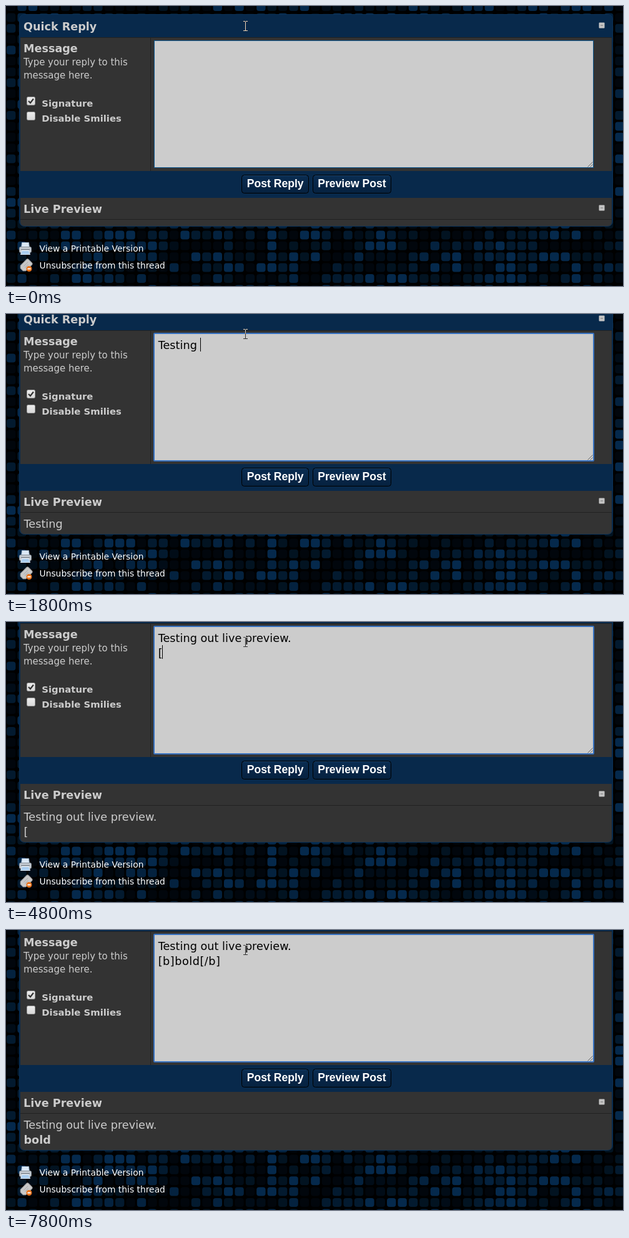
Animation, 988 px wide and 448 px high, one loop 8000 ms. Source, as an HTML page:

```html
<!DOCTYPE html>
<html lang="en">
<head>
<meta charset="utf-8">
<title>Quick Reply</title>
<style>
  html, body { margin: 0; width: 100%; height: 100%; overflow: hidden; background: #000; }
  svg { display: block; width: 988px; height: 448px; }
  text { font: 17.6px "DejaVu Sans", Verdana, sans-serif; fill: #ccc; white-space: pre; }
  .bold { font-weight: bold; }
  .small { font-size: 14.96px; }
  .option { font-size: 14.85px; }
  .link { font-size: 13.85px; fill: #fff; }
  .button { font: bold 17.6px "Liberation Sans", Arial, sans-serif; fill: #fff; }
  .post { font-size: 17.7px; }
  .typed { fill: #000; }
  .code { letter-spacing: .5px; }
  .pointer { mix-blend-mode: difference; }
</style>
</head>
<body>
<svg id="stage" viewBox="0 0 988 448" xmlns="http://www.w3.org/2000/svg">
  <defs>
    <linearGradient id="btn" x2="0" y2="1">
      <stop stop-color="#0a2d52"/><stop offset="1" stop-color="#06213f"/>
    </linearGradient>
    <linearGradient id="box" x2="0" y2="1">
      <stop stop-color="#eee"/><stop offset="1" stop-color="#d8d8d8"/>
    </linearGradient>
    <clipPath id="inner"><rect id="innerShape" x="23" y="14" width="947" rx="6"/></clipPath>
    <g id="toggle">
      <rect width="9" height="9" rx="1" fill="#c4c4c4"/>
      <path d="M2.5 4.5h4" stroke="#777"/>
    </g>
    <rect id="check" width="13" height="13" rx="2" fill="url(#box)" stroke="#999"/>
  </defs>

  <g id="tiles"></g>

  <g id="panel">
    <rect id="frame" x="21.5" y="13.5" width="950" rx="8" fill="#08294b" stroke="#0b3258"/>
    <g clip-path="url(#inner)">
      <rect x="23" y="14" width="947" height="36" fill="#08294b"/>
      <rect x="23" y="50" width="947" height="214" fill="#333"/>
      <path d="M23 50.5h947M231.5 50v214" stroke="#222"/>
      <rect x="23" y="264" width="947" height="43" fill="#08294b"/>
      <rect x="23" y="307" width="947" height="140" fill="#333"/>
      <path d="M23 341.5h947" stroke="#222"/>
    </g>
    <text class="bold" x="28" y="39">Quick Reply</text>
    <text class="bold" x="28" y="74">Message</text>
    <text class="small" x="28" y="95">Type your reply to this</text>
    <text class="small" x="28" y="116">message here.</text>
    <text class="option bold" x="57.3" y="161">Signature</text>
    <text class="option bold" x="57.3" y="185">Disable Smilies</text>
    <use href="#check" x="33.5" y="145.5"/>
    <use href="#check" x="33.5" y="169.5"/>
    <path d="M36 152l3 3 5-6.5" fill="none" stroke="#333" stroke-width="2.2"/>
    <use href="#toggle" x="949.5" y="26.5"/>
    <use href="#toggle" x="949.5" y="318.5"/>

    <rect x="237.5" y="55.5" width="703" height="203" fill="#ccc" stroke="#0f5a94"/>
    <rect id="focus" x="237" y="55" width="704" height="204" rx="1" fill="none" stroke="#3670be" stroke-width="2"/>
    <path d="M931.5 257.5l8-8M935.5 257.5l4-4" stroke="#666"/>
    <text id="line1" class="post typed" x="243.7" y="80"></text>
    <text id="line2" class="post typed code" x="243.7" y="104"></text>
    <rect id="caret" width="1" height="22"/>

    <g fill="url(#btn)" stroke="#000">
      <rect x="377.5" y="270.5" width="107" height="29" rx="4"/>
      <rect x="491.5" y="270.5" width="125" height="29" rx="4"/>
    </g>
    <path d="M381 271.5h100M495 271.5h118" stroke="#1b416a"/>
    <text class="button" x="385.7" y="290">Post Reply</text>
    <text class="button" x="499.2" y="290">Preview Post</text>

    <text class="bold" x="28" y="331">Live Preview</text>
    <text id="echo1" class="post" x="28.5" y="366"></text>
    <text id="echo2" x="28.5" y="390"></text>
  </g>

  <g>
    <path d="M25.5 378.500h11l1 9h-13z" fill="#dce9f6" stroke="#9db4cc"/>
    <rect x="21.500" y="385.500" width="19" height="9" rx="2" fill="#c3c9d0" stroke="#8b949e"/>
    <path d="M24 389.500h14" stroke="#6d7680"/>
    <path d="M25.500 391.500h11l2 6h-15z" fill="#a9cdef" stroke="#e4eef8"/>
  </g>
  <g>
    <g transform="rotate(-45 32 415)">
      <path d="M22.500 412l3-3h14q2 0 2 2v8q0 2-2 2h-14l-3-3z" fill="#c9c9c9" stroke="#a5a5a5"/>
      <path d="M28 413.500h10M28 416.500h8" stroke="#adadad"/>
    </g>
    <circle cx="37" cy="420.500" r="4.500" fill="#e8731c"/>
    <path d="M34.500 420.500h5" stroke="#fff" stroke-width="2"/>
  </g>
  <text class="link" x="53.5" y="393">View a Printable Version</text>
  <text class="link" x="53.5" y="420">Unsubscribe from this thread</text>

  <path class="pointer" d="M380 24.500h3M384 24.500h3M383.500 25v15M380 39.500h3M384 39.500h3" stroke="#fff"/>
</svg>
<script>
const LOOP = 8000, LINE = 24;
const FOCUS_AT = 400, CARET_OFF = 7800;
const FIRST = "Testing out live preview.";
const SECOND = "[b]bold[/b]";

// [time, characters typed on line one, on line two (-1: line not begun)]
const STEPS = [
  [0, 0, -1], [800, 1, -1], [1000, 2, -1], [1200, 4, -1], [1400, 5, -1], [1600, 6, -1], [1800, 8, -1],
  [2000, 9, -1], [2200, 11, -1], [2400, 12, -1], [2600, 14, -1], [2800, 15, -1], [3000, 17, -1],
  [3200, 18, -1], [3400, 20, -1], [3600, 21, -1], [3800, 22, -1], [4000, 24, -1], [4200, 25, -1],
  [4400, 25, 0], [4800, 25, 1], [5200, 25, 2], [5400, 25, 3],
  [5800, 25, 4], [6000, 25, 5], [6200, 25, 6], [6400, 25, 7], [6600, 25, 9],
  [7200, 25, 10], [7400, 25, 11]
];

const $ = id => document.getElementById(id);
const set = (id, attrs) => {
  for (const key in attrs) $(id).setAttribute(key, attrs[key]);
};

function drawTiles() {
  let seed = 29;
  const random = () => (seed = (seed * 16807) % 2147483647) / 2147483647;
  const shades = ["#01060c", "#010c17", "#021321", "#031a2f", "#04223f", "#05294c"];
  const pitch = 17.4;
  let tiles = "";
  for (let row = 0; row < 27; row++) {
    for (let col = 0; col < 58; col++) {
      const shade = shades[Math.floor(random() ** 1.4 * shades.length)];
      tiles += `<rect x="${(col * pitch + 1).toFixed(1)}" y="${(row * pitch - 6).toFixed(1)}" width="14.4" height="14" rx="4" fill="${shade}"/>`;
    }
  }
  $("tiles").innerHTML = tiles;
}

function showStep([, count1, count2]) {
  const text1 = FIRST.slice(0, count1);
  const text2 = SECOND.slice(0, Math.max(count2, 0));
  const closed = text2 === SECOND;
  const scroll = LINE * ((count1 > 0) + (count2 > 0));

  $("line1").textContent = $("echo1").textContent = text1;
  $("line2").textContent = text2;
  $("echo2").textContent = closed ? "bold" : text2;
  $("echo2").setAttribute("class", closed ? "bold" : "post code");

  set("panel", { transform: `translate(0 ${-scroll})` });
  set("frame", { height: 339 + scroll });
  set("innerShape", { height: 338 + scroll });

  const onSecond = count2 >= 0;
  const active = $(onSecond ? "line2" : "line1");
  const width = active.textContent ? active.getComputedTextLength() : 0;
  set("caret", { x: 243 + Math.round(width), y: onSecond ? 85 : 62 });
}

let shown;
function render() {
  const t = performance.now() % LOOP;
  const step = STEPS.findLast(s => s[0] <= t);
  if (step !== shown) showStep(shown = step);
  const focused = t >= FOCUS_AT;
  set("focus", { visibility: focused ? "visible" : "hidden" });
  set("caret", { visibility: focused && t < CARET_OFF ? "visible" : "hidden" });
  requestAnimationFrame(render);
}

drawTiles();
render();
</script>
</body>
</html>
```
